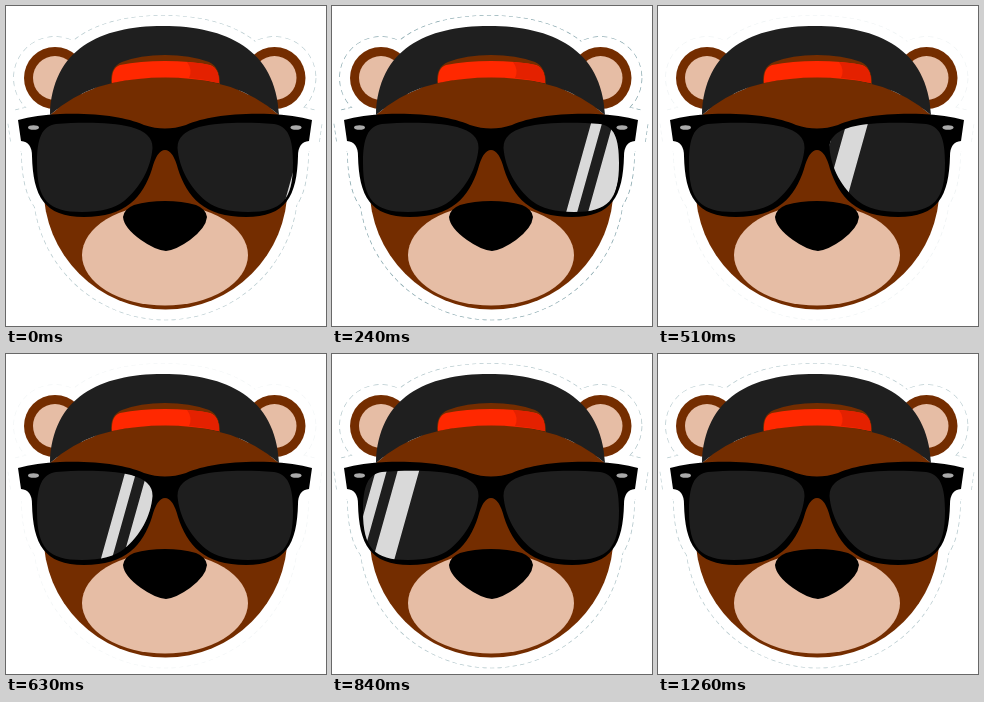
Recreate the animation shown at these times as an HTML page. Size 320 px wide and 320 px high, loop 1.29 s.

```html
<!DOCTYPE html>
<html lang="en">
<head>
<meta charset="utf-8">
<title>Cool bear</title>
<style>
  html, body { margin: 0; width: 100%; height: 100%; overflow: hidden; background: #fff; }
  svg { display: block; width: 100vw; height: 100vh; }
</style>
</head>
<body>
<svg viewBox="0 0 320 320">
  <defs>
    <path id="cap" d="M44 109C46 43 94 20 157 20S270 43 273 109Q230 71 158 71T44 109Z"/>
    <path id="frame" d="M12 114Q30 109 54 108C95 107 118 111 138 119Q149 122.500 159 122.500T180 119C200 111 223 107 264 108Q288 109 306 114L303 135Q292 136 292 150C291 190 280 211 240 211C198 211 181 191 172 163Q167 144 159 144T146 163C137 191 120 211 78 211C38 211 27 190 26 150Q26 136 15 135Z"/>
    <path id="lens" d="M31 157C31 132 36 120 50 118C75 116 105 116 125 121Q147 127 146.500 142C145 162 134 182 118 195Q104 206 76 206C42 206 31 194 31 157Z"/>
    <g id="skull">
      <circle cx="49" cy="72" r="31"/>
      <circle cx="268.500" cy="72" r="31"/>
      <circle cx="159.500" cy="181.500" r="122"/>
      <path d="M44 109Q86 71 158 71T273 109Z"/>
    </g>
    <g id="shape">
      <use href="#skull"/>
      <use href="#cap"/>
      <use href="#frame"/>
    </g>
    <clipPath id="lenses">
      <use href="#lens"/>
      <use href="#lens" transform="matrix(-1 0 0 1 318 0)"/>
    </clipPath>
  </defs>

  <g stroke-linejoin="round">
    <use id="rim" href="#shape" fill="none" stroke="#2f6672" stroke-width="21.600" stroke-dasharray="4 3"/>
    <use href="#shape" fill="#fff" stroke="#fff" stroke-width="20.400"/>
  </g>

  <use href="#skull" fill="#742d00"/>
  <g fill="#e6bda5">
    <circle cx="49" cy="72" r="22"/>
    <circle cx="268.500" cy="72" r="22"/>
    <ellipse cx="159" cy="249" rx="83" ry="50.500"/>
  </g>

  <use href="#cap" fill="#1f1f1f"/>
  <path fill="#742d00" d="M105 77C105 66 107 60 116 56Q134 49 159 49T203 56Q214 61 214 78Q158 65 105 77Z"/>
  <path fill="#ff2800" d="M106 77Q105 62 114 59Q134 55 159 55T204 59Q213 62 213 77Q158 66 106 77Z"/>
  <path fill="#e42100" d="M181 56Q200 57 206 60Q213 63 213 77Q198 73 183 72Q187 64 181 56Z"/>

  <use href="#frame"/>
  <g clip-path="url(#lenses)">
    <path fill="#1e1e1e" d="M20 105H300V215H20Z"/>
    <path id="shine" fill="#d9d9d9" d="M3.400 105h-21.500l-30.800 110h21.500ZM-29 105h-11l-30.800 110h11Z"/>
  </g>
  <g fill="#aaa">
    <ellipse cx="27.500" cy="121.500" rx="5.500" ry="2.300"/>
    <ellipse cx="290" cy="121.500" rx="5.500" ry="2.300"/>
  </g>
  <path d="M117 211Q118 203 128 199Q142 195 159 195T190 199Q200 203 201 211Q200 222 184 234Q170 244 160 245Q149 244 135 234Q118 222 117 211Z"/>
</svg>

<script>
const LOOP = 1290, STEP = 30;
const shine = document.getElementById('shine');
const rim = document.getElementById('rim');

// [time, strength] of the faint sticker edge
const rimKeys = [[0, .35], [240, .6], [360, .4], [510, .08], [720, .04], [960, .75], [1260, .35], [LOOP, .35]];

function rimAt(t) {
  const i = rimKeys.findIndex(k => k[0] > t);
  const [t0, a] = rimKeys[i - 1], [t1, b] = rimKeys[i];
  return a + (b - a) * (t - t0) / (t1 - t0);
}

// Glint sweeps right to left, fastest near the middle
const glintAt = t => 184.5 - 162 * Math.sin(Math.PI * (t - 575) / LOOP);

function draw(now) {
  const t = Math.floor(now % LOOP / STEP) * STEP;
  shine.setAttribute('transform', `translate(${glintAt(t).toFixed(2)} 0)`);
  rim.setAttribute('opacity', rimAt(t).toFixed(3));
  requestAnimationFrame(draw);
}
draw(performance.now());
</script>
</body>
</html>
```
